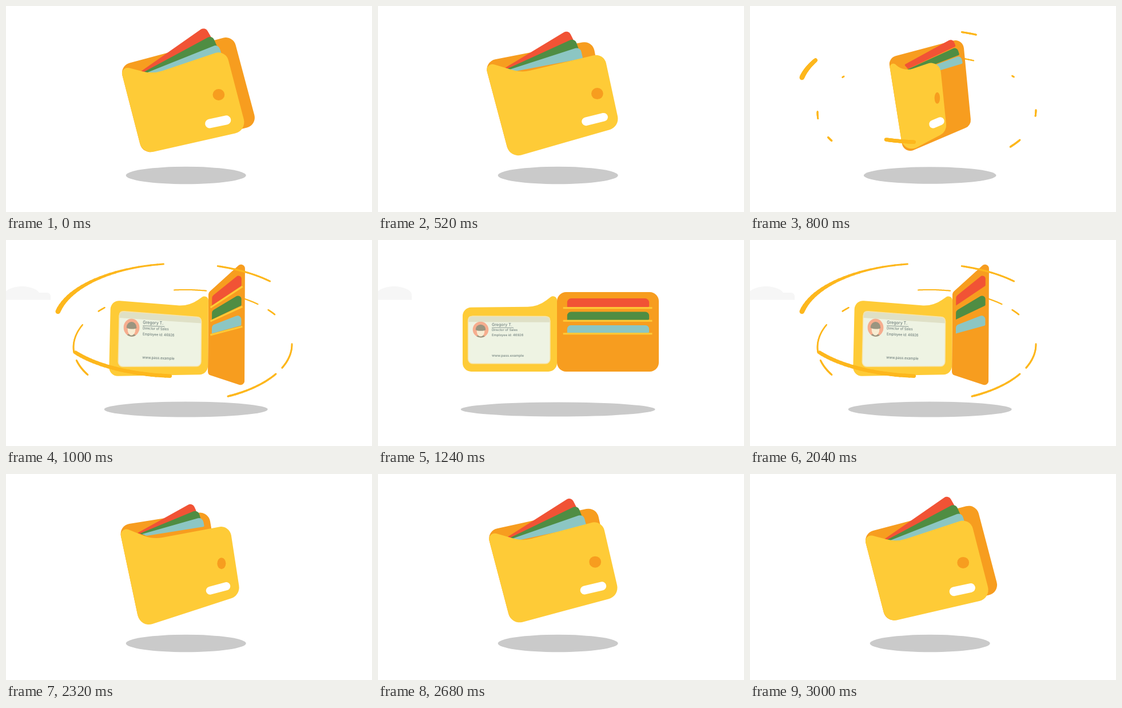
Recreate the animation shown at these times as an HTML page with a canvas. Size 640x360 px, loop 3.04 s.

```html
<!DOCTYPE html>
<html lang="en">
<head>
<meta charset="utf-8">
<title>Wallet</title>
<style>
html, body { margin: 0; width: 100%; height: 100%; overflow: hidden; background: #fff; }
canvas { display: block; }
</style>
</head>
<body>
<canvas id="stage" width="640" height="360"></canvas>
<script>
const ctx = document.getElementById('stage').getContext('2d');
const LOOP = 3040, STEP = 40, RAD = Math.PI / 180;
const YELLOW = '#fecb37', ORANGE = '#f79d1f', STREAK = '#fdb71d', INK = '#73827f';
const CARD_COLORS = ['#f15335', '#4f8d43', '#8cc6c3'];

// The wallet hangs on six points: hinge, free edge of the cover, free edge of the back (each top, bottom).
// Everything else is placed relative to them. The second half of the loop runs backwards.
const poses = [
  { at: 0, points: [[199, 104], [239, 259], [384, 76], [421, 218], [397, 51], [439, 208]] },
  { at: 520, points: [[186, 97], [231, 266], [395, 82], [423, 211], [375, 60], [400, 190]] },
  { at: 720, points: [[197, 90], [235, 269], [391, 89], [410, 212], [354, 65], [375, 190]] },
  { at: 1000, points: [[354, 92], [353, 235], [183, 105], [180, 238], [418, 34], [417, 256]] },
  { at: 1160, points: [[313, 91], [313, 230], [148, 118], [148, 230], [491, 91], [491, 230]] }
];

// Streaks are arcs, in degrees, on ellipses around the wallet
const rings = [
  { x: 309, y: 185, rx: 191, ry: 98, tilt: -1, width: a => 2.8 + 0.8 * Math.sin(a),
    arcs: [[0, 25], [32, 66], [151, 167], [175, 204], [220, 225], [266, 283], [290, 314], [322, 328]] },
  { x: 306, y: 147, rx: 220, ry: 106, tilt: 0, width: a => 3 + 6 * Math.max(0, -Math.cos(a)) ** 3,
    arcs: [[192, 262], [287, 315]] },
  { x: 306, y: 147, rx: 220, ry: 91, tilt: 0, width: () => 6.5, arcs: [[95, 147]] }
];

const ramp = (x, a, b) => Math.max(0, Math.min(1, (x - a) / (b - a)));
const mix = (a, b, f) => Array.isArray(a) ? a.map((v, i) => mix(v, b[i], f)) : a + (b - a) * f;
const polar = ([x, y], r, a) => [x + r * Math.cos(a), y + r * Math.sin(a)];

// Maps (u, v) in the unit square into a quad
const inQuad = (tl, tr, br, bl) => (u, v) => mix(mix(tl, tr, u), mix(bl, br, u), v);
const box = (place, u0, v0, u1, v1) => [place(u0, v0), place(u1, v0), place(u1, v1), place(u0, v1)];

function pointsAt(u) {
  const i = Math.max(1, poses.findIndex(p => p.at > u));
  const next = u < poses.at(-1).at ? i : poses.length - 1;
  const a = poses[next - 1], b = poses[next];
  return mix(a.points, b.points, ramp(u, a.at, b.at));
}

function roundPoly(points, radii, color) {
  const n = points.length;
  ctx.beginPath();
  points.forEach((p, i) => {
    const a = points[(i + n - 1) % n], b = points[(i + 1) % n];
    const [ax, ay, bx, by] = [p[0] - a[0], p[1] - a[1], b[0] - p[0], b[1] - p[1]];
    const turn = Math.abs(Math.atan2(ax * by - ay * bx, ax * bx + ay * by));
    const room = 0.48 * Math.min(Math.hypot(ax, ay), Math.hypot(bx, by));
    const r = Math.min(radii[i] ?? radii, room / Math.max(Math.tan(turn / 2), 0.001));
    if (!i) ctx.moveTo((a[0] + p[0]) / 2, (a[1] + p[1]) / 2);
    ctx.arcTo(p[0], p[1], b[0], b[1], r);
  });
  ctx.closePath();
  ctx.fillStyle = color;
  ctx.fill();
}

function ellipse(x, y, rx, ry, color, from = 0, to = 7) {
  ctx.beginPath();
  ctx.ellipse(x, y, rx, ry, 0, from, to);
  ctx.fillStyle = color;
  ctx.fill();
}

function line(a, b, width, color, cap = 'round') {
  ctx.beginPath();
  ctx.moveTo(...a);
  ctx.lineTo(...b);
  ctx.lineWidth = width;
  ctx.lineCap = cap;
  ctx.strokeStyle = color;
  ctx.stroke();
}

function drawRing({ x, y, rx, ry, tilt, width, arcs }, u) {
  const from = ramp(u, 1020, 1200), to = ramp(u, 740, 980);
  if (to <= from) return;
  const parts = 24;
  ctx.save();
  ctx.translate(x, y);
  ctx.rotate(tilt * RAD);
  for (const [start, end] of arcs) {
    const angle = i => mix(start, end, mix(from, to, i / parts)) * RAD;
    const point = a => [rx * Math.cos(a), ry * Math.sin(a)];
    for (let i = 0; i < parts; i++) line(point(angle(i)), point(angle(i + 1)), width(angle(i)), STREAK);
  }
  ctx.restore();
}

function drawCloud(u) {
  const right = mix(78, 59, ramp(u, 1000, 1120));
  ctx.save();
  ctx.globalAlpha = ramp(u, 840, 960);
  ctx.beginPath();
  ctx.ellipse(28, 96, 31, 15, 0, 0, 7);
  ctx.roundRect(-20, 92, right + 20, 20, 6);
  ctx.clip();
  ctx.fillStyle = '#f6f6f6';
  ctx.fillRect(0, 80, 80, 24.5);
  ctx.restore();
}

// Cards fan out of the closed wallet and settle into slots on the open back
function drawCards(hinge, flap, place, open, lined) {
  const [dx, dy] = [flap[0] - hinge[0], flap[1] - hinge[1]];
  const length = 0.69 * Math.hypot(dx, dy);
  CARD_COLORS.forEach((color, i) => {
    const base = [hinge[0] + 33 + 4 * i, hinge[1] + 13 + i];
    const angle = Math.atan2(dy, dx) + (6.6 * i - 20) * RAD;
    const fan = [base, polar(base, length, angle), polar(base, length, angle + 9 * RAD), [base[0] + 8, base[1] + 3]];
    const bottom = 0.188 + 0.162 * i;
    const slot = box(place, 0.1, 0.08 + 0.169 * i, 0.905, bottom);
    roundPoly(mix(fan, slot, open), [7 * open, 8, 2, 0], color);
    if (lined) line(place(0.06, bottom + 0.012), place(0.935, bottom + 0.012), 3, YELLOW, 'butt');
  });
}

function drawClasp(place, u) {
  const slide = 0.04 * ramp(u, 0, 520);
  const [x, y] = place(0.83 + slide, 0.515);
  ellipse(x, y, 10.4 * (1 - ramp(u, 520, 900) ** 2), 10, ORANGE);
  line(place(0.68 + slide, 0.825), place(0.84 + slide, 0.825), mix(16, 14, ramp(u, 0, 720)), '#fff');
}

function drawAvatar(x, y, r) {
  ctx.save();
  ellipse(x, y, r, r, '#f6ad8e');
  ctx.clip();
  ellipse(x, y + 14, 9, 4.5, '#9a9580');
  ellipse(x, y + 3, 6.8, 9, '#f7ecd2');
  ellipse(x, y, 8.8, 9, '#9a9580', Math.PI, 0);
  ellipse(x, y, 8.8, 2.2, '#9a9580');
  ctx.restore();
}

function drawBadge(inner, flat) {
  // The contents lean towards the hinge until the cover lies flat
  const place = (u, v) => inner(mix(u, 1, 0.035 * (1 - flat)), v);
  const card = box(place, 0.058, 0.134, 0.927, 0.875);
  roundPoly(card, 8, '#eef3e3');
  roundPoly(box(place, 0.058, 0.134, 0.927, 0.225), [8, 8, 0, 0], '#dfe0c6');
  roundPoly(card, 8, 'transparent');
  ctx.lineWidth = 1.5;
  ctx.strokeStyle = '#f6e4ab';
  ctx.stroke();

  const axis = (a, b, size) => [(b[0] - a[0]) / size, (b[1] - a[1]) / size];
  const across = axis(place(0, 0.5), place(1, 0.5), 165);
  const down = axis(place(0.309, 0), place(0.309, 1), 112);
  ctx.save();
  ctx.transform(...across, ...down, ...place(0.309, 0.268));
  drawAvatar(-19.5, 8.5, 13.8);
  ctx.fillStyle = INK;
  ctx.textBaseline = 'middle';
  const write = (text, y, size) => {
    ctx.font = `500 ${size}px Inter, "Open Sans", sans-serif`;
    ctx.fillText(text, 0, y);
  };
  write('Gregory T.', 0, 7);
  write('Director of Sales', 9, 5.7);
  write('Employee id: 46926', 18, 5.8);
  write('www.pass.example', 54, 6);
  line([0, 5], [38, 5], 0.8, INK, 'butt');
  ctx.restore();
}

function draw(t) {
  const u = Math.min(t, LOOP - t);
  const open = ramp(u, 720, 1000), flat = ramp(u, 1000, 1160);
  const [hingeTop, hingeBottom, freeTop, freeBottom, flapTop, flapBottom] = pointsAt(u);
  const back = [hingeTop, flapTop, flapBottom, hingeBottom];
  const onCover = inQuad(hingeTop, freeTop, freeBottom, hingeBottom);

  ctx.fillStyle = '#fff';
  ctx.fillRect(0, 0, 640, 360);
  drawCloud(u);
  ellipse(314.7, 296, 105 + 38 * open + 27 * flat, 15.2 - 1.7 * open - flat, '#cacaca');
  drawRing(rings[0], u);

  roundPoly(back, mix(18, 7, open) + 9 * flat, ORANGE);
  drawCards(hingeTop, flapTop, inQuad(...back), open, t > 900 && t < 1960);

  const dip = onCover(mix(0.28, 0.2, open), 0.15);
  roundPoly([hingeBottom, hingeTop, dip, freeTop, freeBottom], mix([20, 10, 60, 18, 20], [15, 7, 55, 15, 15], open), YELLOW);
  if (hingeBottom[0] > freeBottom[0]) {
    drawBadge(inQuad(freeTop, mix(hingeTop, hingeBottom, 0.2), hingeBottom, freeBottom), flat);
  } else {
    drawClasp(onCover, u);
  }
  drawRing(rings[1], u);
  drawRing(rings[2], u);
}

function tick(now) {
  draw(Math.floor(now % LOOP / STEP) * STEP);
  requestAnimationFrame(tick);
}
draw(0);
requestAnimationFrame(tick);
</script>
</body>
</html>
```
